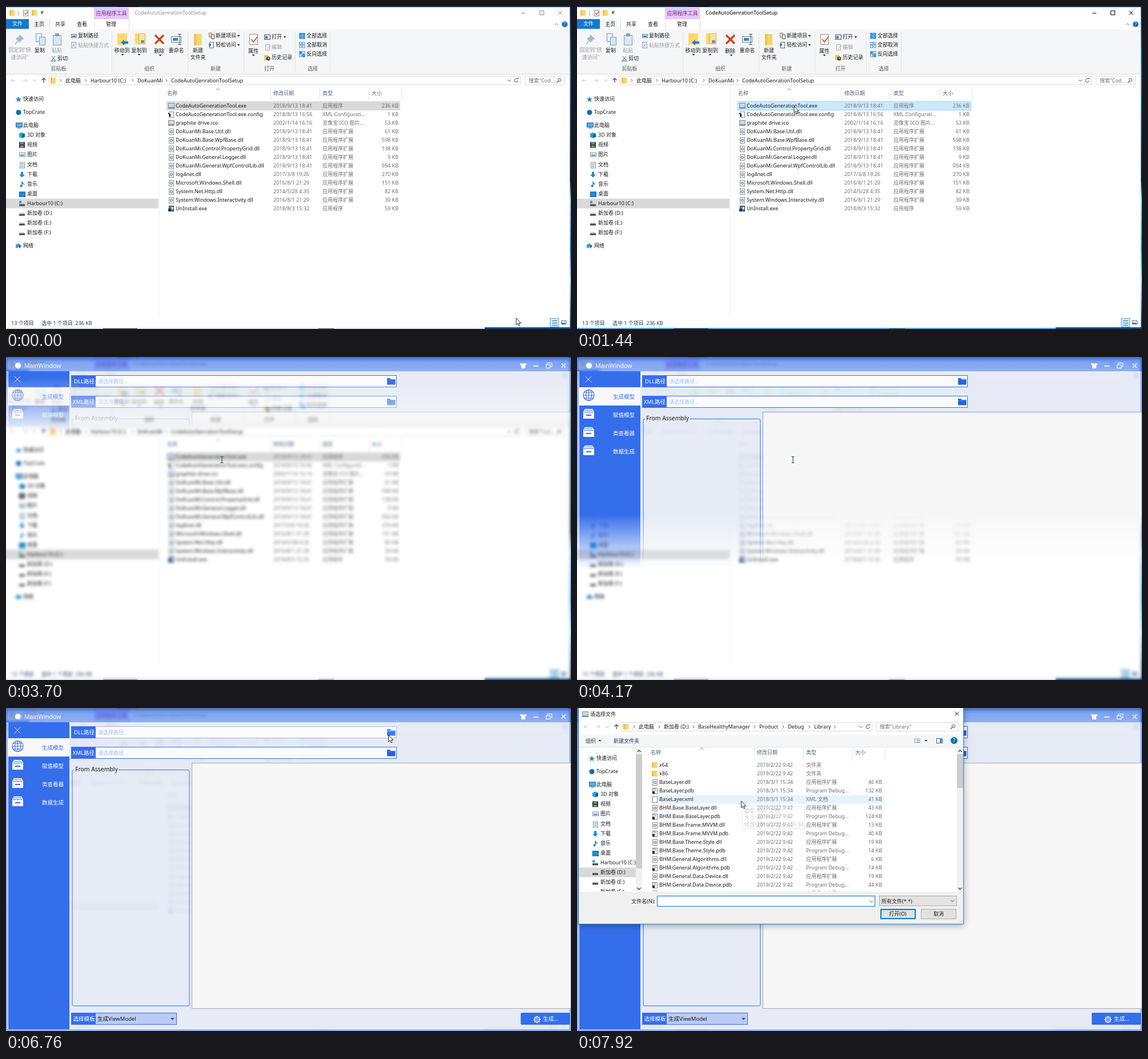
An HTML page with a canvas for the animation above (8 s loop, 989x566 px).

```html
<!DOCTYPE html>
<html lang="zh-CN">
<head>
<meta charset="utf-8">
<style>
html, body { margin: 0; width: 100%; height: 100%; overflow: hidden; background: #fff; }
canvas { display: block; width: 989px; height: 566px; }
</style>
</head>
<body>
<canvas id="stage" width="989" height="566"></canvas>
<script>
const W = 989, H = 566, LOOP = 8000;
const FONT = '"Noto Sans", "Noto Sans CJK SC", "Noto Sans CJK", sans-serif';
const BLUE = '#356eeb', INK = '#1a1a1a', GRAY = '#6d6d6d', PALE = '#9c9c9c';
const stage = document.getElementById('stage').getContext('2d');
let c = stage;

// Drawing helpers, all working on the current context c
const rect = (x, y, w, h, f) => { c.fillStyle = f; c.fillRect(x, y, w, h); };
const frame = (x, y, w, h, s, lw = 1) => {
  c.strokeStyle = s; c.lineWidth = lw; c.strokeRect(x + .5, y + .5, w - 1, h - 1);
};
const panel = (x, y, w, h, f, s) => { rect(x, y, w, h, f); frame(x, y, w, h, s); };
const line = (d, s, lw = 1) => { c.strokeStyle = s; c.lineWidth = lw; c.stroke(new Path2D(d)); };
const fill = (d, f) => { c.fillStyle = f; c.fill(new Path2D(d)); };
const disc = (x, y, r, f) => { c.fillStyle = f; c.beginPath(); c.arc(x, y, r, 0, 7); c.fill(); };
const ring = (x, y, r, s, lw = 1, a = 0, b = 2 * Math.PI) => {
  c.strokeStyle = s; c.lineWidth = lw; c.beginPath(); c.arc(x, y, r, a, b); c.stroke();
};
const text = (s, x, y, f = INK, size = 9, align = 'left') => {
  c.font = `${size}px ${FONT}`; c.textAlign = align; c.fillStyle = f;
  c.fillText(s, x, y + size * .36);
};
const mid = (s, x, y, f, size) => text(s, x, y, f, size, 'center');
const at = (x, y, draw) => { c.save(); c.translate(x, y); draw(); c.restore(); };
const clip = (x, y, w, h, draw) => {
  c.save(); c.beginPath(); c.rect(x, y, w, h); c.clip(); draw(); c.restore();
};
const down = (x, y, f = '#333') => fill(`M${x - 2.5} ${y - 1}h5l-2.5 3z`, f);
const chevron = (x, y, f = '#555') => line(`M${x - 3} ${y - 1.5}l3 3 3-3`, f);
const cross = (x, y, r, f, lw) => line(`M${x - r} ${y - r}l${2 * r} ${2 * r}m0-${2 * r}l-${2 * r} ${2 * r}`, f, lw);
function layer(draw) {
  const canvas = Object.assign(document.createElement('canvas'), { width: W, height: H });
  const outer = c;
  c = canvas.getContext('2d'); draw(); c = outer;
  return canvas;
}

const page = () => panel(-4, -5, 9, 11, '#fff', '#8c8c8c');
const drive = () => { fill('M-4-1h8l1 2h-10z', '#c8c8c8'); rect(-5, 1, 10, 3, '#444'); };
const icons = {
  folder() { rect(-5, -5, 9, 10, '#fbd36a'); rect(-5, -5, 3, 10, '#f3c04a'); rect(3, -3, 2, 8, '#ffe394'); },
  exe() { panel(-5, -5, 11, 10, '#c6d9ec', '#7f8fa0'); rect(-4, 2, 9, 2, '#8798a8'); },
  dll() { page(); ring(.5, .5, 2, '#7d93a6', 1.6); },
  cfg() { page(); line('M-5-2l3 2v4', '#111', 2); },
  pdb() { page(); disc(-2, 3, 2.4, '#222'); line('M-3-3h5M-1-1h4', '#888'); },
  xml: page,
  uninstall() { panel(-4, -5, 9, 10, '#4d88c9', '#1d2f4f'); rect(-5, 0, 5, 5, '#26374f'); rect(1, -3, 3, 4, '#fff'); },
  star() { fill('M0-5l1.5 3.4 3.7.3-2.9 2.4 1 3.7-3.3-2-3.3 2 1-3.7-2.9-2.4 3.7-.3z', '#1f8ad8'); },
  cloud() { disc(0, 0, 4.5, '#0b6cbd'); },
  pc() { panel(-5, -5, 12, 8, '#4fb1ee', '#2b5f86'); rect(-2, 4, 6, 1, '#456'); },
  cube() { fill('M-5-3l5-2 5 2v6l-5 2-5-2z', '#23a3dc'); fill('M0-1l5-2v6l-5 2z', '#0c6a9c'); },
  film() { rect(-5, -5, 10, 10, '#333'); rect(-3, -4, 6, 3, '#5d9bd0'); rect(-3, 1, 6, 3, '#b98b5e'); },
  photo() { panel(-5, -4, 11, 8, '#dff0fb', '#8796a3'); rect(-3, 0, 7, 2, '#3d8cc7'); },
  doc() { page(); line('M-2-2h5M-2 .5h5M-2 3h5', '#4b93c7'); },
  arrow() { fill('M-2-5h4v5h3l-5 5-5-5h3z', '#1e88d8'); },
  note() { line('M0 3v-8q0 3 4 5', '#1681d2', 1.5); disc(-1.5, 3, 2, '#1681d2'); },
  desk() { panel(-5, -4, 11, 9, '#1a8fe0', '#0a5ca0'); },
  system() { drive(); rect(-5, -5, 4, 4, '#18a0e8'); },
  drive,
  net() { fill('M-5-2l6-3v7l-6 2z', '#3a9be0'); fill('M1-3l4 3-4 5z', '#1d659f'); }
};
const icon = (kind, x, y) => at(x, y, icons[kind]);

const row = s => s.split('|');
const DLL = '应用程序扩展';
const toolFiles = [
  'CodeAutoGenerationTool.exe|2018/9/13 18:41|应用程序|236|exe',
  'CodeAutoGenerationTool.exe.config|2018/8/13 16:56|XML Configurati...|1|cfg',
  'graphite drive.ico|2002/1/14 16:16|览像宝 ICO 图片...|53|exe',
  ...['Base.Util|61', 'Base.WpfBase|598', 'Control.PropertyGrid|138', 'General.Logger|9', 'General.WpfControlLib|954']
    .map(row).map(([n, k]) => `DoKuanMi.${n}.dll|2018/9/13 18:41|${DLL}|${k}|dll`),
  ...['log4net|2017/3/8 19:26|270', 'Microsoft.Windows.Shell|2016/8/1 21:29|151',
    'System.Net.Http|2014/5/28 4:35|82', 'System.Windows.Interactivity|2016/8/1 21:29|39']
    .map(row).map(([n, d, k]) => `${n}.dll|${d}|${DLL}|${k}|dll`),
  'UnInstall.exe|2018/8/3 15:32|应用程序|59|uninstall'
].map(row);
const types = { dll: DLL, pdb: 'Program Debug...', xml: 'XML 文档' };
const libFiles = [
  ...['x64', 'x86'].map(n => [n, '2019/2/22 9:42', '文件夹', '', 'folder']),
  ...['BaseLayer.dll|46', 'BaseLayer.pdb|132', 'BaseLayer.xml|41', 'BHM.Base.BaseLayer.dll|43',
    'BHM.Base.BaseLayer.pdb|124', 'BHM.Base.Frame.MVVM.dll|13', 'BHM.Base.Frame.MVVM.pdb|40',
    'BHM.Base.Theme.Style.dll|19', 'BHM.Base.Theme.Style.pdb|14', 'BHM.General.Algorithms.dll|6',
    'BHM.General.Algorithms.pdb|14', 'BHM.General.Data.Device.dll|19', 'BHM.General.Data.Device.pdb|44',
    'BHM.General.Data.Model.dll|22'].map(row).map(([n, k]) => {
    const ext = n.slice(-3);
    return [n, n.startsWith('BaseL') ? '2018/3/1 15:34' : '2019/2/22 9:42', types[ext], k, ext];
  })
];
const places = [
  '快速访问|163|star', 'TopCrate|186|cloud', '此电脑|209|pc', '3D 对象|226|cube', '视频|243|film',
  '图片|260|photo', '文档|278|doc', '下载|295|arrow', '音乐|312|note', '桌面|329|desk',
  'Harbour10 (C:)|346|system', '新加卷 (D:)|363|drive', '新加卷 (E:)|380|drive', '新加卷 (F:)|397|drive', '网络|420|net'
].map(row);

const rowAt = (x, y, count) => {
  const i = Math.floor((y - 167.5) / 15);
  return x > 281 && x < 690 && i >= 0 && i < count ? i : -1;
};

function fileList(files, hover, selected, active) {
  ['名称|282|463', '修改日期|468|549', '类型|554|635', '大小|640|692'].map(row).forEach(([s, x, end]) => {
    text(s, +x, 153, '#4c607a');
    rect(+end, 143, 1, 22, '#e5e5e5');
  });
  line('M368.5 147.500l3-3 3 3', '#777');
  files.forEach(([name, date, type, size, kind], i) => {
    const y = 175 + 15 * i, lit = i === hover;
    if (i === selected) {
      if (lit || active) panel(281, y - 8, 409, 16, '#cce8ff', '#99d1ff');
      else rect(281, y - 8, 409, 16, '#d9d9d9');
    } else if (lit) rect(281, y - 7.5, 409, 15, '#e5f3ff');
    icon(kind, 289, y);
    text(name, 297, y);
    text(date, 468, y, GRAY);
    text(type, 554, y, GRAY);
    if (size) text(size + ' KB', 687, y, GRAY, 9, 'right');
  });
}

function placeList(selected, left, width) {
  places.forEach(([name, ys, kind], i) => {
    const y = +ys, child = i > 2 && i < 14;
    if (i === selected) rect(left, y - 8.5, width, 17, '#d9d9d9');
    icon(kind, child ? 28 : 22, y + .5);
    text(name, child ? 37 : 30, y);
  });
}

function addressBar(y, x, end, crumbs, searchX, searchEnd, search) {
  line(`M${x - 59} ${y}h-7m3-3l-3 3 3 3M${x - 45} ${y}h7m-3-3l3 3-3 3`, '#c9c9c9');
  chevron(x - 25, y, '#bbb');
  line(`M${x - 9} ${y + 4}v-8m-3.500 3.500l3.500-3.500 3.500 3.500`, '#444', 1.2);
  panel(x, y - 8, end - x, 16, '#fff', '#d9d9d9');
  icon('folder', x + 8, y);
  crumbs.forEach(([s, cx]) => {
    line(`M${cx - 9.5} ${y - 2.5}l2.500 2.500-2.500 2.500`, '#555');
    text(s, cx, y);
  });
  chevron(end - 20, y);
  ring(end - 8, y, 3, '#555', 1, 0, 5.2);
  line(`M${end - 7} ${y - 3}h2.500v-2`, '#555');
  panel(searchX, y - 8, searchEnd - searchX, 16, '#fff', '#d9d9d9');
  text(search, searchX + 7, y, GRAY);
  ring(searchEnd - 9, y - 1, 2.6, '#555');
  line(`M${searchEnd - 11} ${y + 1}l-3 3`, '#555', 1.3);
}

const help = (x, y, r) => { disc(x, y, r, '#0b6ec5'); mid('?', x, y, '#fff', r * 1.6); };

function ribbon() {
  rect(0, 41, 987, 78, '#f5f6f7');
  rect(0, 119, 987, 1, '#dadbdc');
  [185, 318, 416, 506, 567].forEach(x => rect(x, 45, 1, 70, '#e1e2e3'));
  ['剪贴板|92', '组织|251', '新建|367', '打开|461', '选择|537'].map(row).forEach(([s, x]) => mid(s, +x, 110, '#5a5a5a'));
  [['固定到"快', 24, 77, PALE], ['速访问"', 24, 90, PALE], ['复制', 59, 78], ['粘贴', 89, 78, PALE], ['移动到', 203, 78],
    ['复制到', 233, 78], ['删除', 268, 79], ['重命名', 298, 78], ['新建', 336, 78], ['文件夹', 336, 90], ['属性', 433, 79]]
    .forEach(a => mid(...a));
  [['复制路径', 126, 52], ['粘贴快捷方式', 126, 69, PALE], ['剪切', 90, 92], ['新建项目', 367, 52], ['轻松访问', 367, 68],
    ['打开', 465, 54], ['编辑', 465, 72, PALE], ['历史记录', 465, 90], ['全部选择', 526, 52], ['全部取消', 526, 68],
    ['反向选择', 526, 84]].forEach(a => text(...a));
  [[204, 85], [233, 85], [270, 86], [433, 86], [407, 52], [407, 68], [488, 54]].forEach(([x, y]) => down(x, y));

  fill('M24 50l8 8-4 1-4 5-7-7 5-3z', '#a9b9c6'); line('M21 61l-5 6', '#a9b9c6', 1.5);
  panel(52, 48, 11, 15, '#e9f3fc', '#6f9cc4'); panel(58, 54, 11, 15, '#d5e8f8', '#6f9cc4');
  panel(82, 51, 15, 18, '#dbe8f7', '#7a9cc6'); rect(86, 48, 7, 5, '#8b9bb0');
  panel(114, 49, 10, 7, '#cfe3f5', '#5c84a8'); rect(116, 52, 6, 2, '#356b9a');
  panel(114, 63, 9, 11, '#e7eef6', '#93a9c0'); line('M116 71l4-4', '#56a');
  line('M80 88l5 6M86 88l-5 6', '#666'); ring(80.5, 96, 1.6, '#2879c0'); ring(85.5, 96, 1.6, '#2879c0');
  rect(195, 48, 17, 20, '#ffd76b'); fill('M201 64l6-5v3h7v4h-7v3z', '#1d7fd2');
  rect(226, 48, 12, 19, '#ffd76b'); panel(232, 48, 12, 19, '#ffe394', '#d9b04f'); rect(236, 60, 6, 5, '#5a95cb');
  cross(268.5, 58.5, 7.5, '#c6431a', 3.2);
  panel(289, 53, 18, 11, '#fff', '#5b7f9f'); rect(292, 56, 9, 5, '#2a86d6'); line('M301 49.500h6M304 49v18M301 67.500h6', '#444');
  rect(329, 49, 13, 20, '#fbd36a'); rect(329, 49, 4, 20, '#f3c04a');
  panel(355, 47, 6, 8, '#ffe394', '#777'); panel(359, 50, 6, 8, '#fff', '#456');
  panel(356, 63, 8, 11, '#fff', '#667'); rect(355, 66, 4, 4, '#2a86d6');
  panel(426, 49, 15, 19, '#fff', '#8a8a8a'); line('M429 58l4 5 7-9', '#d5572a', 2);
  panel(452, 50, 11, 9, '#e5f0fa', '#447'); rect(454, 53, 4, 4, '#1f78c8');
  panel(454, 67, 8, 11, '#f3f3f3', '#b0b0b0'); line('M457 75l6-6', '#aac');
  rect(452, 86, 7, 9, '#f3c04a'); disc(459, 92, 3.5, '#444'); line('M459 90v2h2', '#fff');
  const grid = (y, colors) => colors.forEach((f, i) => panel(513 + i % 2 * 5.5, y + (i >> 1) * 5.5, 5, 5, f, '#4f9bd6'));
  const on = '#2d98e6', off = '#eef3f8';
  grid(47, [on, on, on, on]); grid(63, [off, off, off, off]); grid(79, [on, off, off, on]);
}

function explorer(active, hover) {
  rect(0, 0, W, H, '#fff');
  ribbon();
  icon('folder', 11, 12); rect(21, 8, 1, 9, '#aaa');
  panel(30, 7, 9, 11, '#fff', '#8a8a8a'); line('M32 12l2 3 4-5', '#d5572a', 1.3);
  icon('folder', 50, 12); down(63, 12); rect(61, 9, 5, 1, '#333');
  rect(154, 3, 61, 20, '#e8c6fc'); rect(154, 23, 1, 18, '#e3d3ee'); rect(215, 23, 1, 18, '#e3d3ee');
  mid('应用程序工具', 184.5, 13, '#5c3277');
  const tone = active ? '#000' : '#8f8f8f';
  text('CodeAutoGenrationToolSetup', 225, 12, tone);
  rect(902, 12, 7, 1, tone); frame(934, 8, 8, 8, tone); cross(970, 12, 3.5, tone);
  rect(0, 23, 40, 17, '#1477cf'); mid('文件', 20, 31, '#fff');
  rect(40, 23, 36, 18, '#f5f6f7'); rect(76, 23, 1, 18, '#dadbdc');
  ['主页|58', '共享|95', '查看|133', '管理|184'].map(row).forEach(([s, x]) => mid(s, +x, 31.5));
  line('M960.500 33.500l3-3 3 3', '#777'); help(978, 32, 5);
  addressBar(130.5, 75, 901, [['此电脑', 104], ['Harbour10 (C:)', 148], ['DoKuanMi', 230], ['CodeAutoGenrationToolSetup', 289]], 908, 978, '搜索"Cod...');
  rect(268, 143, 1, 402, '#efefef');
  placeList(10, 0, 267);
  fileList(toolFiles, hover, 0, active);
  text('13 个项目', 9, 555.5, '#1e395b'); text('选中 1 个项目  236 KB', 62, 555.5, '#1e395b');
  panel(952, 547, 16, 16, '#cbe8f8', '#5fb2e0'); line('M956 551.500h9M956 555.500h9M956 559.500h9', '#4a6a80');
  panel(972, 551, 9, 7, '#eaf4fb', '#667'); rect(973, 555, 6, 2, '#2d7fc0');

  // Desktop visible around the window
  rect(0, 0, W, 2, '#173a63'); rect(195, 0, 36, 1, '#111');
  rect(0, 564, 838, 2, active ? '#5aa6d8' : '#d5dade'); rect(838, 563, 151, 3, '#0e4d86');
  rect(170, 565, 60, 1, '#333'); rect(546, 565, 28, 1, '#555');
  const edge = c.createLinearGradient(0, 0, 0, H);
  [[0, '#16324f'], [.2, '#2b78b5'], [.54, '#0d2c4c'], [.6, '#7cc6ec'], [.75, '#1b8fd8'], [.85, '#8fd0ee'], [1, '#0b3d70']]
    .forEach(s => edge.addColorStop(...s));
  rect(987, 0, 2, H, edge);
}

const blurred = hover => layer(() => {
  const sharp = layer(() => explorer(false, hover));
  c.drawImage(sharp, 0, 0);
  c.filter = 'blur(2.6px)';
  c.drawImage(sharp, 0, 0);
});
const blurHover = blurred(0), blurPlain = blurred(-1);

function pathField(label, y, hover, pressed) {
  panel(114, y, 570, 21, 'rgba(253,253,254,.95)', hover ? '#a5bbe6' : BLUE);
  rect(114, y, 43, 21, BLUE);
  text(label, 155, y + 10.5, '#fff', 9.5, 'right');
  text('请选择路径...', 161, y + 10.5, '#a3bdf7', 9);
  const f = pressed ? '#2f7df5' : '#2863d8';
  fill(`M667 ${y + 5}h5l1.500 2h8v9.500h-14.500z`, f);
  line(`M667 ${y + 8}h14`, pressed ? '#c9daf8' : '#5a8cf0');
}

function appWindow(t, [x, y]) {
  rect(0, 25, W, 541, 'rgba(228,233,246,.9)');
  const bar = c.createLinearGradient(0, 2, 0, 25);
  bar.addColorStop(0, 'rgba(53,110,235,.8)'); bar.addColorStop(.35, 'rgba(53,110,235,.62)'); bar.addColorStop(1, 'rgba(53,110,235,.55)');
  rect(0, 2, W, 23, bar);
  frame(1, 2, 987, 563, 'rgba(53,110,235,.8)', 1.5);
  disc(21, 15, 5, '#fff'); text('MainWindow', 32, 15.5, '#fff', 10.5);
  fill('M902 10.500l2 1h3l2-1 2.500 2-1.500 2-1-.5v6h-7v-6l-1 .5-1.500-2z', '#fff');
  rect(923, 15, 9, 1.5, '#fff'); frame(945, 13, 8, 7, '#fff'); line('M947.500 13v-2.500h8v6.500h-2', '#fff');
  cross(976, 15, 3.5, '#fff', 1.4);

  rect(4, 25, 107, 538, BLUE); rect(4, 53, 107, 32, '#f8f8fa');
  cross(20, 39, 5.5, '#dbe6ff');
  ['生成模型', '赋值模型', '类查看器', '数据生成'].forEach((s, i) => {
    const cy = 68 + 32 * i;
    mid(s, 82, cy + 2, i ? '#fff' : BLUE, 9.5);
    if (!i) {
      ring(20.5, 67, 9.5, BLUE, 1.2);
      line('M20.500 57.500v19M11 67h19M13 62h15M13 72h15', BLUE);
      c.beginPath(); c.ellipse(20.5, 67, 5, 9.5, 0, 0, 7); c.stroke();
    } else {
      fill(`M14 ${cy - 9}h13l3 5v12h-19v-12z`, '#fff');
      line(`M12 ${cy - 3.5}h17M14 ${cy - 6.5}h13`, BLUE);
      rect(16, cy + 1, 9, 2, BLUE);
    }
  });
  const inField = top => x > 157 && x < 684 && y > top && y < top + 21;
  pathField('DLL路径', 32, inField(32), t >= 6520 && t < 6830);
  pathField('XML路径', 68, inField(68));
  c.strokeStyle = BLUE; c.lineWidth = 1;
  c.stroke(new Path2D('M119 108.500q-3 0-3 3v408q0 2.500 3 2.500h199q3 0 3-2.500v-408q0-3-3-3h-121'));
  text('From Assembly', 121, 107.5, INK, 10.4);
  panel(325, 96, 664, 431, '#f7f7f7', x > 325 && y > 96 && t < 6800 ? '#75a0ef' : '#a6abb4');
  panel(114, 534, 185, 21, '#bccbf5', BLUE); rect(114, 534, 43, 21, BLUE);
  text('选择模板', 155.5, 545, '#fff', 9.5, 'right'); text('生成ViewModel', 160, 545, INK, 9.5);
  fill('M288 543h7l-3.500 4z', '#2456c8');
  c.fillStyle = BLUE; c.beginPath(); c.roundRect(901, 534, 86, 21, 2); c.fill();
  for (let i = 0; i < 8; i++) at(929.5, 546, () => { c.rotate(i * Math.PI / 4); rect(-1, -6.2, 2, 2.5, '#fff'); });
  ring(929.5, 546, 4.3, '#fff', 1.2); ring(929.5, 546, 1.8, '#fff');
  text('生成...', 940, 545, '#fff', 9.5);
}

function scrollbar(x, top, bottom, thumb) {
  rect(x, top, 11, bottom - top, '#f0f0f0');
  rect(x, top + 10, 11, thumb, '#cdcdcd');
  line(`M${x + 2.5} ${top + 6}l3-3 3 3`, '#444', 1.3);
  line(`M${x + 2.5} ${bottom - 6}l3 3 3-3`, '#444', 1.3);
}

function fileDialog(t, [x, y]) {
  c.save();
  c.shadowColor = 'rgba(0,0,0,.35)'; c.shadowBlur = 11; c.shadowOffsetY = 2;
  rect(2, -1, 675, 380, '#fff');
  c.restore();
  icon('exe', 14, 11); text('请选择文件', 23, 11); cross(665, 10, 3.5, '#222');
  addressBar(33, 78, 517, [['此电脑', 108], ['新加卷 (D:)', 152], ['BaseHealthyManager', 212], ['Product', 319], ['Debug', 369], ['Library', 415]], 523, 668, '搜索"Library"');
  line('M450 30.500l2.500 2.500-2.500 2.500', '#555');
  rect(3, 47, 673, 22, '#f5f6f7'); rect(3, 68, 673, 1, '#e4e4e4');
  text('组织', 15, 57.5, '#1e395b'); down(40, 57); text('新建文件夹', 64, 57.5, '#1e395b');
  line('M590 54.500h3m1 0h7M590 57.500h3m1 0h7M590 60.500h3m1 0h7', '#678'); down(611, 57);
  panel(629, 53, 11, 9, '#fff', '#456'); rect(635, 53, 5, 9, '#4a90d0'); help(660, 57, 6);
  if (t > 7000) clip(3, 69, 673, 252, () => {
    clip(3, 69, 100, 252, () => at(4, -75, () => placeList(11, -1, 100)));
    at(-153, -75, () => fileList(libFiles, rowAt(x + 153, y + 75, libFiles.length), -1));
    scrollbar(103, 71, 321, 200); scrollbar(665, 71, 321, 59);
  });
  rect(3, 322, 673, 56, '#f0f0f0');
  text('文件名(N):', 137, 338.5, INK, 9, 'right');
  panel(140, 329, 382, 19, '#fff', '#0078d7'); chevron(515, 339);
  panel(529, 329, 136, 18, '#e3e3e3', '#adadad'); text('所有文件(*.*)', 533, 338.5); chevron(657, 338);
  panel(531, 352, 62, 18, '#e1e1e1', '#0078d7'); frame(532, 353, 60, 16, '#0078d7'); mid('打开(O)', 561.5, 360.5);
  panel(602, 352, 62, 18, '#e1e1e1', '#adadad'); mid('取消', 633, 360.5);
  for (let i = 0; i < 3; i++) rect(674 - 2 * i, 372 + 2 * i, 1, 1, '#999');
  frame(2, -1, 675, 380, '#2b8ad8');
}

function tooltip(alpha) {
  c.globalAlpha = alpha;
  panel(289, 172, 110, 40, '#fff', '#b5b5b5');
  ['类型: XML 文档', '大小: 40.1 KB', '修改日期: 2018/3/1 15:34'].forEach((s, i) => text(s, 293, 180 + 12 * i, '#575757'));
  c.globalAlpha = 1;
}

const path = [
  [0, 893, 547], [70, 893, 547], [800, 381, 180], [880, 381, 180], [1190, 380, 175.5], [3440, 380, 175.5], [3500, 378, 180],
  [4800, 378, 180], [5350, 659, 66], [5650, 674, 50], [5880, 668, 43], [6050, 668, 43], [6210, 669.5, 47.5],
  [7250, 669.5, 47.5], [7720, 287.5, 163], [LOOP, 287.5, 163]
];
function pointer(t) {
  const i = path.findIndex(k => k[0] > t), [t0, x0, y0] = path[i - 1], [t1, x1, y1] = path[i];
  const u = (t - t0) / (t1 - t0), e = u * u * (3 - 2 * u);
  return [x0 + (x1 - x0) * e, y0 + (y1 - y0) * e];
}
function busy(x, y, r, lw, t) {
  ring(x, y, r, '#1a78c4', lw);
  ring(x, y, r, '#58b4f0', lw * .6, t / 150, t / 150 + 1.6);
}
function drawCursor(t, [x, y]) {
  if (t >= 3140 && t < 3440) return busy(x, y, 5.6, 2.6, t);
  const inText = y > 96 && x > 325;
  if (t >= 3440 && t < 5350 && inText) return line(`M${x - 2.5} ${y - 5.5}h5m-2.500 0v11m-2.500 0h5`, '#24573c', 1.1);
  at(x, y, () => {
    const d = 'M0 0V11.800L2.800 9.300 4.700 13.400 6.500 12.600 4.700 8.600H8.400Z';
    fill(d, '#fff'); line(d, '#111', .9);
  });
  if (t >= 1740 && t < 2060) busy(x + 10.5, y + .5, 4.3, 1.9, t);
}

const appCanvas = layer(() => {});
function drawApp(t, pos) {
  c = appCanvas.getContext('2d');
  c.clearRect(0, 0, W, H);
  appWindow(t, pos);
  if (t < 4750) {
    const edge = (t - 3630) * .51, mask = c.createLinearGradient(0, edge, 0, edge + 95);
    mask.addColorStop(0, '#000'); mask.addColorStop(1, 'rgba(0,0,0,0)');
    c.globalCompositeOperation = 'destination-in';
    rect(0, 0, W, H, mask);
    c.globalCompositeOperation = 'source-over';
  }
  c = stage;
  c.drawImage(appCanvas, 0, 0);
}

function render(t) {
  const pos = pointer(t);
  if (t < 3140) explorer(t >= 1440 && t < 2440, rowAt(...pos, toolFiles.length));
  else c.drawImage(t < 3220 ? blurHover : blurPlain, 0, 0);
  if (t >= 3440) drawApp(t, pos);
  if (t >= 6830) {
    const u = Math.min(1, (t - 6830) / 230), e = 1 - (1 - u) ** 3, scale = .92 + .08 * e;
    c.save();
    c.globalAlpha = e;
    c.translate(340 * (1 - scale), 190 * (1 - scale));
    c.scale(scale, scale);
    fileDialog(t, pos);
    c.restore();
  }
  if (t > 7850) tooltip(Math.min(1, (t - 7850) / 220));
  drawCursor(t, pos);
}

const start = performance.now();
function tick() {
  render((performance.now() - start) % LOOP);
  requestAnimationFrame(tick);
}
tick();
</script>
</body>
</html>
```
